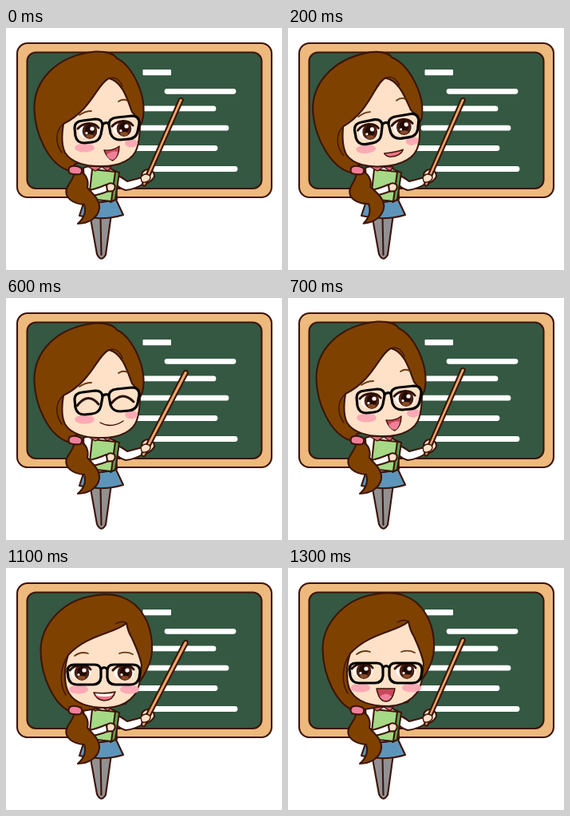
Animation, 346 px wide and 303 px high, one loop 1800 ms. Source, as an HTML page:

```html
<!DOCTYPE html>
<html lang="en">
<head>
<meta charset="utf-8">
<title>Teacher at the board</title>
<style>
  html, body { margin: 0; width: 100%; height: 100%; overflow: hidden; background: #fff; }
  svg { display: block; width: 100vw; height: 100vh; }
  .ink { stroke: #3d1408; stroke-width: 2.1; stroke-linejoin: round; stroke-linecap: round; }
  .thin { stroke-width: 1.4; }
  .hair { fill: #7f4100; }
  .skin { fill: #ffe1c8; }
  .line { fill: none; }
  .white { fill: #fff; }
  .pink { fill: #f0809a; }
  .blush { fill: #fbaab5; }
  .rim { fill: none; stroke: #000; stroke-width: 3.2; stroke-linejoin: round; stroke-linecap: round; }
  .lash { fill: none; stroke: #2c1005; stroke-width: 3; stroke-linecap: round; }
  .brow { fill: none; stroke: #6b3810; stroke-width: 1.8; stroke-linecap: round; }
</style>
</head>
<body>
<svg viewBox="0 0 346 303">
  <defs>
    <g id="eye">
      <ellipse class="white" rx="12.5" ry="9.5"/>
      <ellipse cx="1" rx="9.4" ry="10" fill="#4f200f"/>
      <ellipse cx="1" cy="-1" rx="6" ry="7" fill="#220a04"/>
      <ellipse cx="1" cy="6.4" rx="4.6" ry="2.3" fill="#8a4a28"/>
      <circle class="white" cx="4" cy="-3" r="2.6"/>
      <circle class="white" cx="-3" cy="2.6" r="1.6"/>
      <path class="lash" d="M-14-3Q-9-9 0-9.6Q8-9.6 12-4"/>
    </g>
  </defs>

  <rect class="ink" x="14" y="19" width="319" height="193" rx="13" fill="#edb97c"/>
  <rect class="ink" x="26.5" y="30.5" width="294" height="170.5" rx="11" fill="#345842"/>
  <rect class="white" x="171.500" y="52" width="35.500" height="7.200" rx="1"/>
  <path d="M202 79.300H285M160 100.900H260M170 125.200H276M160 150.500H262M186 176.500H287" stroke="#fff" stroke-width="6.800" stroke-linecap="round"/>

  <g class="ink">
    <path fill="#929092" d="M105 233L114 283Q119 294 125 284L132 233Z"/>
    <path class="line" d="M118.500 238L119.500 284"/>
    <path fill="#5d95ba" d="M98 217L138 215L147 234Q120 242 92 235Z"/>
    <path class="white" d="M97 175Q115 168 137 179L139 214Q118 221 99 216Z"/>
    <path class="white" d="M138 184Q146 187 152 192L171 187L174 194Q162 202 150 203Q142 201 137 194Z"/>
    <path fill="#62a04e" d="M136 179L142 181L137 215L131 218Z"/>
    <path fill="#a5d985" d="M108 177L137 180L132 217L104 214Z"/>
    <path class="white" d="M100 204Q112 202 126 196L129 204Q114 210 101 211Z"/>
    <path class="skin" d="M126 197Q130 192 136 196Q138 201 134 204Q130 205 127 204Z"/>
    <path fill="#e06b78" d="M102 173L112 179L120 174L128 179L132 174Z" stroke-width="1.400"/>
  </g>

  <g class="ink">
    <path class="skin" d="M170 185Q170 178 178 177Q186 178 186 186Q183 192 175 195Q170 193 170 185Z"/>
    <path id="stick" fill="#e9a767"/>
    <path class="skin" d="M169 187Q173 181 179 184Q183 187 179 191Q173 195 170 192Z" stroke-width="1.400"/>
  </g>

  <path id="tail" class="hair ink" d="M93 180C101 183 104 192 102 200C107 206 118 214 117 226C115 238 103 245 90 245C97 239 101 231 98 221C83 220 74 212 75.500 203C78 194 85 190 86 180Z"/>

  <g id="side">
    <path class="hair ink" d="M80 181C52 173 36 132 35.500 103C35 70 60 37 112 31.500C127 31 136 35 139 40C158 48 178 88 171 118L155 153L87 172Z"/>
    <path class="skin ink" d="M129 65C114 72 108 104 72 122C70 134 69 148 74 158C82 171 101 175 116 175C145 176 160 165 164 153Q168 142 168 120Q163 112 158 107C152 91 146 69 129 65Z"/>
    <path class="line ink thin" d="M72 122C62 130 61 146 70 158M129 65Q140 61 146 75"/>
    <path class="brow" d="M92 111Q99 106 107 106M141 94Q147 90 152 93"/>
    <ellipse class="blush" cx="98.500" cy="152" rx="12.300" ry="5.600"/>
    <ellipse class="blush" cx="157" cy="146" rx="8" ry="5.400"/>
    <g id="open">
      <use href="#eye" x="104" y="131"/>
      <use href="#eye" x="147" y="128"/>
    </g>
    <path id="shut" class="lash" d="M89 135Q103 117 116 133M132 132Q146 115 160 130"/>
    <path class="rim" d="M96 118L112 116Q121 116 121 124L119 135Q117 144 108 145L98 146Q89 146 87 137L86 127Q86 119 96 118ZM139 114L158 112Q167 112 167 121L165 132Q163 140 154 141L143 142Q134 142 131 134L129 123Q129 115 139 114ZM121 123Q125 119 129 122"/>
    <g id="sideMouth"></g>
  </g>

  <g id="front">
    <path class="hair ink" d="M84 181C61 174 44 137 43.500 104C43 72 70 43 103 36C135 28 160 37 173 60C184 78 187 108 177 126Q172 137 166 144L150 170Z"/>
    <path class="skin ink" d="M151 69C137 82 102 83 78 109C73 123 72 146 79 157C88 171 108 175 126 175C150 174 168 160 168 137L170 121C167 107 162 97 158 88Q153 80 151 69Z"/>
    <path class="line ink thin" d="M78 109C68 123 66 145 75 159M151 69Q146 65 137 70"/>
    <path class="brow" d="M86 110Q94 104 103 107M142 107Q151 104 159 108"/>
    <ellipse class="blush" cx="91" cy="152" rx="12" ry="5.600"/>
    <ellipse class="blush" cx="155" cy="152" rx="12" ry="5.600"/>
    <use href="#eye" x="94" y="131"/>
    <use href="#eye" x="148" y="131"/>
    <path class="rim" d="M86 121H111Q119 121 119 129V137Q118 146 109 146H89Q80 146 78 137L77 129Q77 121 86 121ZM135 121H159Q168 121 168 130L167 137Q165 146 156 146H137Q128 146 127 137V129Q127 121 135 121ZM119 127Q123 122 127 127"/>
    <g id="frontMouth"></g>
  </g>

  <path class="ink pink" d="M80 174Q86 171 94 175Q97 179 93 183Q86 184 80 182Q77 178 80 174Z"/>
</svg>
<script>
const $ = id => document.getElementById(id);
const shape = (d, fill) => `<path class="ink thin" d="${d}" fill="${fill}"/>`;
const mouths = {
  laugh: shape('M123 155Q134 156 142 150Q142 163 134 168Q127 166 123 155Z', '#c8485a')
    + '<path class="pink" d="M126 161Q133 155 140 157Q139 165 134 167Q129 167 126 161Z"/>',
  oh: shape('M128 158Q133 152 138 155Q140 163 133 167Q128 166 128 158Z', '#d9596a'),
  smile: shape('M118 156Q132 164 147 154', 'none'),
  talk: shape('M121 159Q134 159 145 156Q142 164 128 164Q123 163 121 159Z', '#ee7586'),
  grin: shape('M110 156Q124 158 137 155Q134 166 123 166Q113 165 110 156Z', '#ee7586')
    + '<path class="white" d="M112 157Q124 159 135 157L132 160Q123 162 114 160Z"/>',
  cheer: shape('M111 153H134Q131 169 123 169Q114 169 111 153Z', '#c8485a')
    + '<path class="pink" d="M115 163Q123 156 130 163Q127 168 123 168Q118 168 115 163Z"/>'
};
const sticks = {
  up: 'M171 195L217 89Q220 86 222 90L175 197Q172 199 171 195Z',
  down: 'M170 195L223 92Q227 89 228 94L174 198Q170 199 170 195Z'
};

// start, view, tilt, lift, mouth, stick
const steps = [
  [0, 'side', 0, -2, 'laugh', 'up'],
  [200, 'side', -4, 0, 'talk', 'up'],
  [400, 'side', -4, 0, 'oh', 'down'],
  [600, 'side', 0, 0, 'smile', 'down'],
  [700, 'side', 0, -2, 'laugh', 'up'],
  [900, 'side', -4, 0, 'talk', 'up'],
  [1100, 'front', 0, 0, 'grin', 'down'],
  [1300, 'front', 0, -2, 'cheer', 'up']
];
const LOOP = 1800;
const show = (id, on) => $(id).setAttribute('display', on ? 'inline' : 'none');
let current;

function pose(step) {
  const [, view, tilt, lift, mouth, stick] = step;
  show('side', view === 'side');
  show('front', view === 'front');
  show('open', mouth !== 'smile');
  show('shut', mouth === 'smile');
  $(view).setAttribute('transform', `translate(0 ${lift}) rotate(${tilt} 91 164)`);
  $('tail').setAttribute('transform', `rotate(${tilt} 88 178)`);
  $(view + 'Mouth').innerHTML = mouths[mouth];
  $('stick').setAttribute('d', sticks[stick]);
}

function tick() {
  const t = performance.now() % LOOP;
  const step = steps.findLast(s => s[0] <= t);
  if (step !== current) pose(current = step);
  requestAnimationFrame(tick);
}
tick();
</script>
</body>
</html>
```
